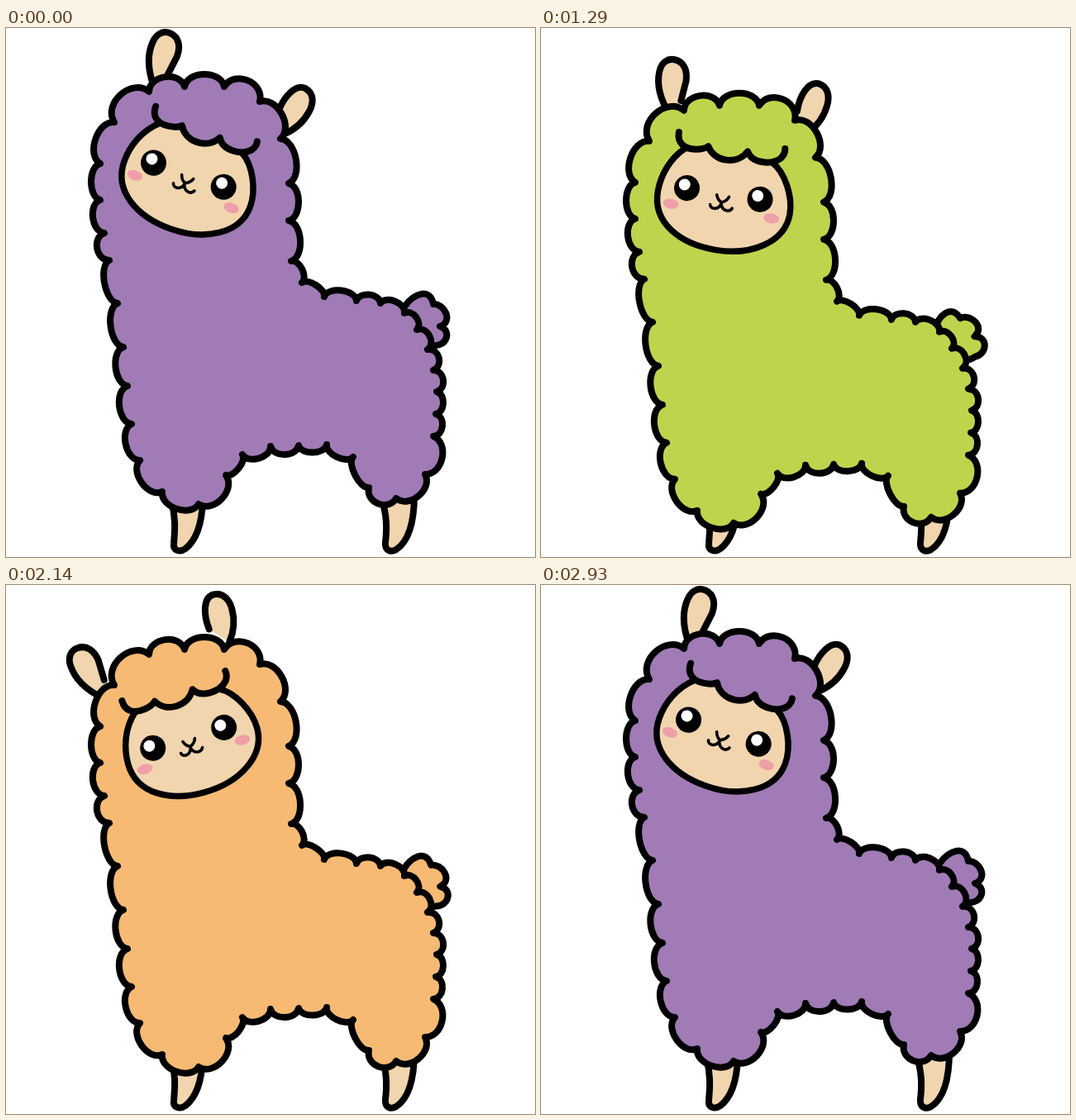
Animation of 640 by 640 pixels, one loop 3000 ms. Source, as an HTML page with a canvas:

```html
<!DOCTYPE html>
<html lang="en">
<head>
<meta charset="utf-8">
<title>Dancing alpaca</title>
<style>
  html, body { margin: 0; width: 100%; height: 100%; overflow: hidden; background: #fff; }
  canvas { display: block; width: 640px; height: 640px; }
</style>
</head>
<body>
<canvas id="stage" width="640" height="640"></canvas>
<script>
const ctx = document.getElementById('stage').getContext('2d');
const LOOP = 3000, STEPS = 42, BOB = 42.5;
const SKIN = '#f1d5ae', BLUSH = '#f09ea8', INK = '#000';
const RAD = Math.PI / 180;

const FURS = [[160, 123, 181], [160, 203, 201], [177, 206, 89], [249, 237, 21], [245, 160, 165]];

// Fleece tufts, clockwise: start x, start y, height of the tuft that follows
const TUFTS = [
  131, 114, 20, 173, 77, 15, 216, 71, 15, 264, 71, 18, 307, 89, 16,
  332, 134, 14, 342, 188, 12, 342, 233, 12.5, 345, 282, 7.5, 358, 308, 6.5,
  385, 325, 10, 424, 330, 9, 453, 333, 9, 482, 345, 8.5, 497, 365, 10,
  510, 389, 10.5, 517, 414, 10, 521, 440, 8.5, 520, 467, 9.5, 517, 494, 16,
  507, 540, 15, 472, 569, 14, 439, 556, 8, 420, 519, 8.5, 388, 504, 9,
  354, 505, 10.5, 320, 506, 10, 286, 516, 7, 266, 541, 16, 233, 576, 14,
  189, 561, 14, 162, 523, 12.5, 152, 479, 12.5, 147, 433, 12, 142, 386, 12,
  135, 333, 11, 125, 281, 12, 119, 248, 11.5, 114, 208, 11, 114, 164, 15
];

function fleecePath() {
  const path = new Path2D(), n = TUFTS.length;
  path.moveTo(TUFTS[0], TUFTS[1]);
  for (let i = 0; i < n; i += 3) {
    const [x, y, h] = TUFTS.slice(i, i + 3);
    const ex = TUFTS[(i + 3) % n], ey = TUFTS[(i + 4) % n];
    const dx = ex - x, dy = ey - y, k = h * 4 / 3 / Math.hypot(dx, dy);
    const at = u => [x + dx * u + dy * k, y + dy * u - dx * k];
    path.bezierCurveTo(...at(0.08), ...at(0.92), ex, ey);
  }
  path.closePath();
  return path;
}

const fleece = fleecePath();
const legs = [
  'M200 572C206 594 204 610 203 624C202 632 210 635 217 630C230 620 237 600 238 572',
  'M454 568C461 590 461 605 459 622C458 632 465 635 472 631C486 622 494 600 494 564'
].map(d => new Path2D(d));
const tail = new Path2D('M483 336C493 322 513 313 517 334C530 333 542 355 525 361C540 366 533 386 517 384Q509 386 502 383');

// Head parts share one upright pose around HEAD
const HEAD = [221, 218.5];
const ears = [
  'M138 139C118 119 114 102 114 90C114 78 121 72 129 72C141 72 147 82 148 94L147 119',
  'M287 102C286 84 292 64 305 64C318 65 322 77 321 88C320 104 314 115 305 125'
].map(d => new Path2D(d));
const faceLine = 'M167 171C149 187 142 210 142 229C142 268 180 287 222 287C266 287 304 264 304 229C304 208 290 180 272 171';
const face = new Path2D(faceLine);
const faceArea = new Path2D(faceLine + 'L262 158L178 158Z');
const fringe = new Path2D('M155 154C155 168 166 173 178 171C185 170 190 168 193 165C203 182 231 182 241 163C248 176 272 175 282 164C285 160 286 157 285 152');
const mouth = new Path2D('M213 221Q215 227 220 229Q226 227 228 221M220 229V232M207 234C208 239 217 240 220 231C223 240 232 239 234 234');

function shape(path, fill, width, area = path) {
  if (fill) {
    ctx.fillStyle = fill;
    ctx.fill(area);
  }
  ctx.lineWidth = width;
  ctx.strokeStyle = INK;
  ctx.stroke(path);
}

function oval(x, y, rx, ry, color) {
  ctx.beginPath();
  ctx.ellipse(x, y, rx, ry, 0, 0, Math.PI * 2);
  ctx.fillStyle = color;
  ctx.fill();
}

function turned(x, y, px, py, degrees, draw) {
  ctx.save();
  ctx.translate(x, y);
  ctx.rotate(degrees * RAD);
  ctx.translate(-px, -py);
  draw();
  ctx.restore();
}

// Four units make one full sway; it lingers on two of the far-left poses
function phase(i) {
  if (i <= 10) return 0.21 * i;
  if (i <= 31) return 2.28 + 0.1975 * (i - 12);
  return i < 41 ? 6.04 + 0.2 * (i - 32) : 8;
}

function furColor(i) {
  const pos = i * FURS.length / (STEPS - 1), k = Math.floor(pos);
  const a = FURS[k % FURS.length], b = FURS[(k + 1) % FURS.length];
  return `rgb(${a.map((v, c) => Math.round(v + (b[c] - v) * (pos - k)))})`;
}

function drawFace(fur) {
  shape(face, SKIN, 7.5, faceArea);
  oval(160, 241, 9.5, 6, BLUSH);
  oval(283, 238, 9.5, 6, BLUSH);
  for (const [x, y] of [[176, 219], [265.5, 217.5]]) {
    oval(x, y, 15.5, 15.5, INK);
    oval(x - 3.5, y - 3.7, 7, 7, '#fff');
  }
  shape(mouth, null, 3.6);
  shape(fringe, fur, 8);
}

function draw(i) {
  const sway = Math.abs((phase(i) % 4) - 2) - 1;
  const drop = BOB * (1 - Math.abs(sway));
  const tilt = 19.2 * sway + 0.8;
  const fur = furColor(i);
  const headY = 178 + drop;

  ctx.fillStyle = '#fff';
  ctx.fillRect(0, 0, 640, 640);
  ctx.lineCap = ctx.lineJoin = 'round';

  legs.forEach(leg => shape(leg, SKIN, 8));
  turned(497, 357 + drop, 497, 357, -0.94 * drop, () => shape(tail, fur, 8));
  turned(221, headY, ...HEAD, 1.24 * tilt, () => ears.forEach(ear => shape(ear, SKIN, 8)));
  turned(0, drop, 0, 0, 0, () => shape(fleece, fur, 8));
  turned(221, headY, ...HEAD, tilt, () => drawFace(fur));
}

const start = performance.now();
function tick() {
  const t = (performance.now() - start) % LOOP;
  // steps fall on whole hundredths of a second
  draw(Math.min(STEPS - 1, Math.floor((t + 5) * STEPS / LOOP)));
  requestAnimationFrame(tick);
}
tick();
</script>
</body>
</html>
```
